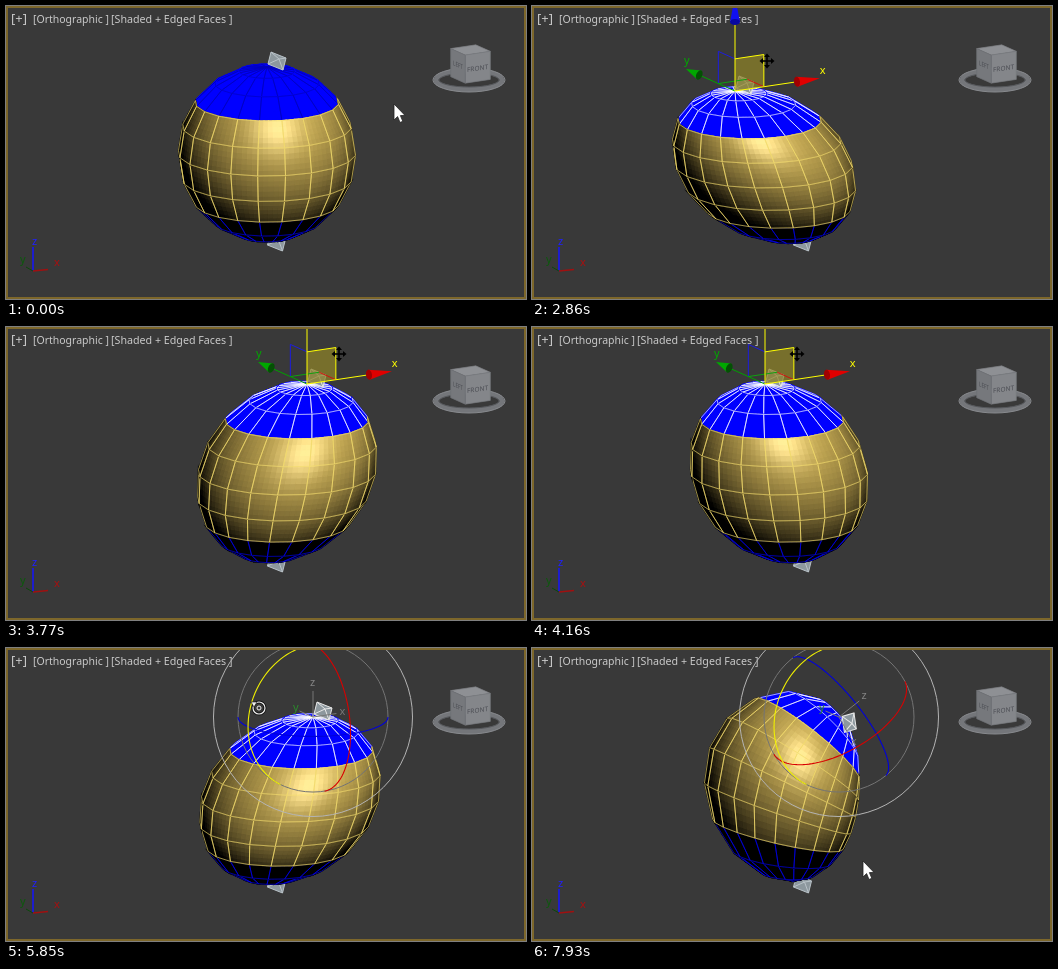
An HTML page with a canvas for the animation above (8 s loop, 520 by 293 pixels).

```html
<!DOCTYPE html>
<html>
<head>
<meta charset="utf-8">
<style>
html, body { margin: 0; width: 100%; height: 100%; overflow: hidden; background: #393939; }
canvas { display: block; }
</style>
</head>
<body>
<canvas id="view" width="520" height="293"></canvas>
<script>
const g = document.getElementById('view').getContext('2d');
const LOOP = 8000, STEP = 130, R = 89, CX = 261, CY = 147, RAD = Math.PI / 180;
const sa = Math.sin(30 * RAD), ca = Math.cos(30 * RAD);
const se = Math.sin(15 * RAD), ce = Math.cos(15 * RAD);
const FONT = '"Noto Sans", "Open Sans", sans-serif';

// key lists: time, x, y
const shiftKeys = [[1950, 0, 0], [2210, -12, 4], [2600, -48, 18], [2860, -58, 24],
  [3120, -18, 10], [3380, 22, -4], [3640, 39, -5], [3770, 40, -4], [3900, 30, -5],
  [4160, -28, -4], [4290, -52, 2], [4420, -62, 8], [4550, -12, 9], [4680, 43, 8], [4940, 46, 8]];
const cursorKeys = [[650, 388, 98], [780, 330, 84], [910, 263, 74], [1040, 263, 74],
  [1170, 268, 58], [1560, 293, 41], [1690, 293, 41], [1950, 293, 31]];
const ringKeys = [[5070, 339, 39], [5330, 290, 48], [5590, 253, 60], [5980, 253, 60]];
const leaveKeys = [[7150, 420, -24], [7280, 408, 2], [7540, 372, 120], [7800, 336, 205], [7930, 331, 213]];

function keyed(keys, t) {
  let i = 0;
  while (i < keys.length - 1 && keys[i + 1][0] <= t) i++;
  const a = keys[i], b = keys[i + 1] || a;
  const k = b === a ? 0 : Math.max(0, (t - a[0]) / (b[0] - a[0]));
  return [a[1] + (b[1] - a[1]) * k, a[2] + (b[2] - a[2]) * k];
}

// world to view: right, up, towards the viewer
function view([x, y, z]) {
  const near = -(x * sa + y * ca);
  return [x * ca - y * sa, z * ce - near * se, near * ce + z * se];
}
const tilt = ([x, y, z], q) => {
  const c = Math.cos(q), s = Math.sin(q);
  return [x * c + z * s, y, z * c - x * s];
};
const mix = (a, b, k) => a.map((v, i) => v + (b[i] - v) * k);
const sub = (a, b) => a.map((v, i) => v - b[i]);
const dot = (a, b) => a[0] * b[0] + a[1] * b[1] + a[2] * b[2];
const cross = (a, b) => [a[1] * b[2] - a[2] * b[1], a[2] * b[0] - a[0] * b[2], a[0] * b[1] - a[1] * b[0]];
const unit = a => { const l = Math.hypot(...a) || 1; return a.map(v => v / l); };

function poly(pts, fill, stroke, width = 1, close = true) {
  g.beginPath();
  pts.forEach(p => g.lineTo(p[0], p[1]));
  if (close) g.closePath();
  if (fill) { g.fillStyle = fill; g.fill(); }
  if (stroke) { g.strokeStyle = stroke; g.lineWidth = width; g.stroke(); }
}
const line = (a, b, color, width) => poly([a, b], null, color, width, false);
function text(s, x, y, color, size = 11) {
  g.fillStyle = color;
  g.font = size + 'px ' + FONT;
  g.fillText(s, x, y);
}
function circle(x, y, r, color, width = 1) {
  g.beginPath();
  g.arc(x, y, r, 0, 7);
  g.strokeStyle = color;
  g.lineWidth = width;
  g.stroke();
}

const LIGHT = unit([.22, .42, .88]), HALF = unit([.12, .27, .95]);
function shade(n, cap) {
  if (cap) return `rgb(0,0,${Math.max(0, Math.min(255, 255 + n[1] * 765)) | 0})`;
  const d = Math.max(0, dot(n, LIGHT));
  const s = 70 * Math.pow(Math.max(0, dot(n, HALF)), 26);
  return `rgb(${[202, 174, 86].map(c => Math.min(255, c * d + s) | 0)})`;
}

function drawBall(shift, angle, selected) {
  const mx = shift[0] / ca / R;
  const mz = (-shift[1] / R - mx * sa * se) / ce;
  const at = (lat, lon) => {
    const p = [Math.cos(lat) * Math.cos(lon), Math.cos(lat) * Math.sin(lon), Math.sin(lat)];
    const w = .5 + Math.sin(lat) / 4 + lat / Math.PI / 2;
    const q = tilt([p[0], p[1], p[2] - 1], angle);
    return view(mix(p, [q[0] + mx, q[1], q[2] + 1 + mz], w));
  };
  const vertex = (i, j) => {
    const lat = (i - 5) * 18 * RAD, lon = j * 18 * RAD, e = .02;
    const m = Math.max(-1.54, Math.min(1.54, lat));
    const n = cross(sub(at(m, lon + e), at(m, lon - e)), sub(at(m + e, lon), at(m - e, lon)));
    return { p: at(lat, lon), n: unit(n) };
  };
  const screen = p => [CX + p[0] * R, CY - p[1] * R];
  const N = 5;
  for (const i of [0, 1, 8, 9, 2, 7, 3, 4, 5, 6]) {
    const cap = i < 3 || i > 6;
    const faces = [];
    for (let j = 0; j < 20; j++) {
      const v = [vertex(i, j), vertex(i, j + 1), vertex(i + 1, j + 1), vertex(i + 1, j)];
      const s = v.map(o => screen(o.p));
      const turn = (s[2][0] - s[0][0]) * (s[3][1] - s[1][1]) - (s[2][1] - s[0][1]) * (s[3][0] - s[1][0]);
      if (turn >= 0) continue;
      faces.push(s);
      const blend = (key, u, w) => mix(mix(v[0][key], v[1][key], u), mix(v[3][key], v[2][key], u), w);
      for (let a = 0; a < N; a++) for (let b = 0; b < N; b++) {
        const u = a / N, w = b / N, d = 1 / N;
        const color = shade(unit(blend('n', u + d / 2, w + d / 2)), cap);
        poly([[u, w], [u + d, w], [u + d, w + d], [u, w + d]].map(k => screen(blend('p', ...k))), color, color, 1.3);
      }
    }
    const edge = !cap ? '#f2da6c' : i < 5 ? '#0000f0' : selected ? '#fff' : '#0000bd';
    faces.forEach(s => poly(s, null, edge, .65));
  }
}

function helper(x, y, angle, selected) {
  g.save();
  g.translate(x, y);
  g.rotate(angle);
  const edge = selected ? '#e8e8e8' : '#b9c2c8';
  poly([[4, -15], [19, -9], [16, 3], [1, -3]], '#8d989e', edge);
  poly([[4, -15], [12, -8], [16, 3]], null, edge, 1, false);
  line([12, -8], [19, -9], edge);
  line([12, -8], [1, -3], edge);
  g.restore();
}

function moveGizmo(o) {
  const L = 98;
  const at = (x, y, z) => {
    const p = view([x * L, y * L, z * L]);
    return [o[0] + p[0], o[1] - p[1]];
  };
  const k = .34, y0 = '#ffff00';
  poly([o, at(k, 0, 0), at(k, 0, k), at(0, 0, k)], 'rgba(140,130,40,.75)');
  poly([at(k, 0, 0), at(k, 0, k), at(0, 0, k)], null, y0, 1, false);
  poly([at(0, k, 0), at(0, k, k), at(0, 0, k)], null, '#1c1ce0', 1, false);
  line(at(k, 0, 0), at(k, k, 0), '#d01010');
  line(at(0, k, 0), at(k, k, 0), '#10a010');
  line(o, at(0, .73, 0), '#00a000');
  line(o, at(.73, 0, 0), y0);
  line(o, at(0, 0, .73), y0);
  const cone = (axis, color, dark) => {
    const base = at(...axis.map(v => v * .73)), tip = at(...axis);
    const a = Math.atan2(tip[1] - base[1], tip[0] - base[0]), nx = -Math.sin(a) * 5, ny = Math.cos(a) * 5;
    poly([[base[0] + nx, base[1] + ny], tip, [base[0] - nx, base[1] - ny]], color);
    g.beginPath();
    g.ellipse(base[0], base[1], 3, 5, a, 0, 7);
    g.fillStyle = dark;
    g.fill();
  };
  cone([0, 1, 0], '#00a800', '#045004');
  cone([1, 0, 0], '#e00000', '#a00000');
  cone([0, 0, 1], '#1010f0', '#0808a0');
  const tx = at(1, 0, 0), ty = at(0, 1, 0);
  text('x', tx[0], tx[1] - 4, y0);
  text('y', ty[0] - 2, ty[1] - 5, '#00a800');
}

function turnGizmo(o, angle) {
  circle(o[0], o[1], 99.5, '#b4b4b4');
  circle(o[0], o[1], 75, '#747474');
  const at = (p, r) => {
    const q = view(tilt(p, angle));
    return [o[0] + q[0] * r, o[1] - q[1] * r, q[2]];
  };
  const ring = (f, color) => {
    g.beginPath();
    let on = false;
    for (let d = 0; d <= 720; d += 3) {
      const p = at(f(Math.cos(d * RAD), Math.sin(d * RAD)), 75);
      if (p[2] < 0) { on = false; continue; }
      on ? g.lineTo(p[0], p[1]) : g.moveTo(p[0], p[1]);
      on = true;
    }
    g.strokeStyle = color;
    g.lineWidth = 1.1;
    g.stroke();
  };
  ring((c, s) => [c, s, 0], '#0000d8');
  ring((c, s) => [0, c, s], '#d80000');
  ring((c, s) => [c, 0, s], '#f0f000');
  [[[1, 0, 0], 'x', '#777'], [[0, 1, 0], 'y', '#2c8a2c'], [[0, 0, 1], 'z', '#858585']].forEach(([axis, name, color]) => {
    line(o, at(axis, 27), '#777');
    const p = at(axis, 34);
    text(name, p[0] - 3, p[1] + 2, color);
  });
}

function drawCube(lit) {
  const tone = v => `rgb(${v + lit},${v + lit + 2},${v + lit + 6})`;
  const band = (rx, ry, w, color) => {
    g.beginPath();
    g.ellipse(463, 74, rx, ry, 0, 0, 7);
    g.lineWidth = w;
    g.strokeStyle = color;
    g.stroke();
  };
  band(33, 9.5, 5, tone(116));
  band(36, 12, 1, tone(136));
  band(30, 7, 1, tone(86));
  const at = (x, y, z) => {
    const p = view([x, y, z].map(v => v * 14.5));
    return [464.5 + p[0], 58 - p[1]];
  };
  poly([at(-1, -1, 1), at(1, -1, 1), at(1, 1, 1), at(-1, 1, 1)], tone(142), tone(125), .7);
  poly([at(-1, -1, -1), at(1, -1, -1), at(1, -1, 1), at(-1, -1, 1)], tone(132), tone(120), .7);
  poly([at(-1, -1, -1), at(-1, 1, -1), at(-1, 1, 1), at(-1, -1, 1)], tone(118), tone(110), .7);
  g.save();
  g.transform(1, -.15, 0, 1, 461, 66);
  text('FRONT', 0, 0, '#4a4c52', 6.5);
  g.restore();
  g.save();
  g.transform(.7, .32, 0, 1, 447, 59);
  text('LEFT', 0, 0, '#4a4c52', 6.5);
  g.restore();
}

function tripod() {
  line([27, 265], [27, 241], '#1414ff', 1.5);
  line([27, 265], [42, 263.5], '#a01010', 1.3);
  line([27, 265], [20, 261], '#0a4a0a');
  text('z', 26, 239, '#2020ff');
  text('x', 48, 260, '#a81010');
  text('y', 14, 257, '#0b5a0b');
}

function cursor(kind, [x, y]) {
  g.save();
  g.translate(x, y);
  if (kind === 'arrow') {
    poly([[0, 0], [0, 16], [3.6, 12.6], [6, 18.5], [8.8, 17.3], [6.4, 11.6], [11, 11.4]], '#fff', '#222', .8);
  } else if (kind === 'move') {
    for (let i = 0; i < 4; i++) {
      line([0, 0], [0, -5], '#000', 1.6);
      poly([[-3, -4], [0, -7.5], [3, -4]], '#000');
      g.rotate(Math.PI / 2);
    }
  } else {
    circle(0, 0, 6, '#111', 3);
    circle(0, 0, 6, '#eee', 1.2);
    poly([[-8, -6], [-2, -6], [-5, -1]], '#eee', '#111', .6);
    circle(0, 0, 2, '#eee', 1);
  }
  g.restore();
}

function draw(t) {
  const shift = keyed(shiftKeys, t);
  const k = Math.max(0, Math.min(1, (t - 5980) / 1040));
  const angle = 60 * RAD * k * k * (3 - 2 * k);
  const selected = t >= 1170;
  const pole = [CX + shift[0], CY - R * ce + shift[1]];

  g.fillStyle = '#393939';
  g.fillRect(0, 0, 520, 293);
  drawCube(t >= 7020 && t < 7800 ? 14 : 0);
  tripod();
  helper(260.5, 242, 0, false);
  drawBall(shift, angle, selected);
  helper(...pole, angle, selected);
  text('[+]', 5, 17, '#cacaca', 13);
  text('[Orthographic ]', 27, 17, '#cacaca', 10.5);
  text('[Shaded + Edged Faces ]', 105, 17, '#cacaca', 10.7);

  if (t >= 5200) turnGizmo(pole, angle);
  else if (selected) moveGizmo(pole);

  if (t < 1170) cursor('arrow', keyed(cursorKeys, t));
  else if (t < 1950) cursor('move', keyed(cursorKeys, t));
  else if (t < 5200) cursor('move', [293 + shift[0], 31 + shift[1]]);
  else if (t < 5980) cursor(t < 5460 ? 'arrow' : 'turn', keyed(ringKeys, t));
  else if (t < 7150) cursor('turn', [253, 60 - 2 * angle / RAD]);
  else cursor('arrow', keyed(leaveKeys, t));

  g.strokeStyle = '#7d672b';
  g.lineWidth = 2;
  g.strokeRect(1, 1, 518, 291);
}

let last = -1;
function tick() {
  const step = Math.floor(performance.now() % LOOP / STEP);
  if (step !== last) draw((last = step) * STEP);
  requestAnimationFrame(tick);
}
tick();
</script>
</body>
</html>
```
